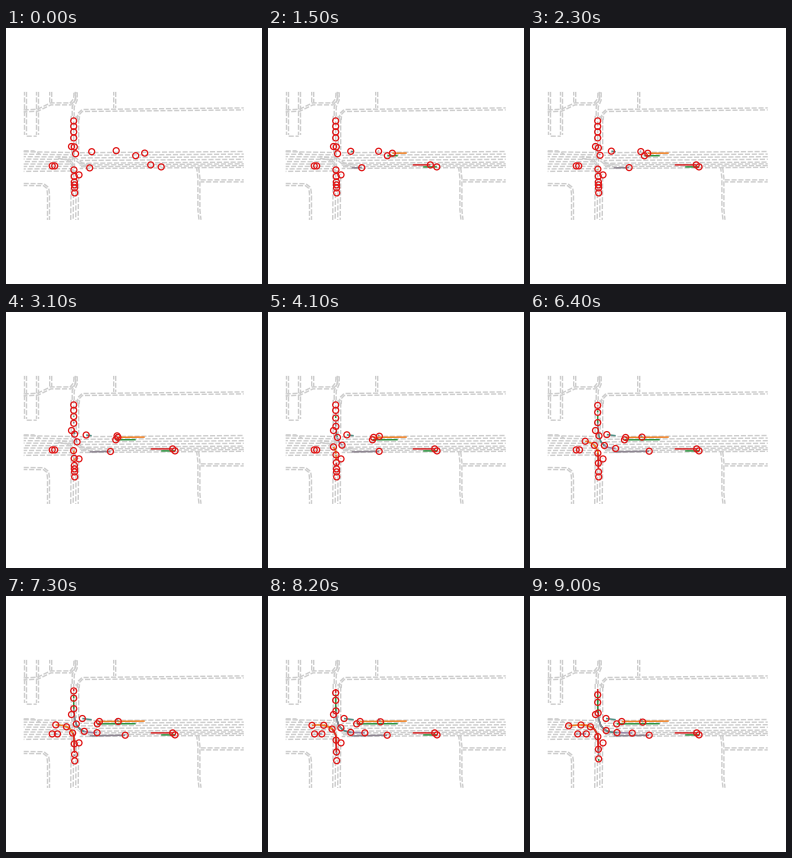
These frames come from a looping animation (256x256 px, 9100 ms). A matplotlib script:

```python
import numpy as np
import matplotlib.pyplot as plt
from matplotlib.animation import FuncAnimation
from matplotlib.patches import Circle

SIZE, DPI = 256, 64
PX = 72 / DPI
FRAMES, STEP = 91, 100
TIMES = np.arange(FRAMES) * STEP / 1000

fig = plt.figure(figsize=(SIZE / DPI, SIZE / DPI), dpi=DPI, facecolor="white")
ax = fig.add_axes([0, 0, 1, 1])
ax.set_xlim(0.3, SIZE + 0.3)
ax.set_ylim(SIZE + 0.1, 0.1)
ax.axis("off")


# --- Street map ---------------------------------------------------------

def lane(pts, shift=0):
    x, y = np.transpose(pts)
    ax.plot(x, y, color="#cdcdcd", lw=1.4 * PX, zorder=1, snap=False,
            linestyle=(shift, (3.6, 1.3)), dash_capstyle="butt")


def street(*pts, gap=2):
    """Two dashed lines on either side of a centre line."""
    p = np.array(pts, float)
    d = np.gradient(p, axis=0)
    normal = np.column_stack([-d[:, 1], d[:, 0]]) / np.hypot(*d.T)[:, None]
    for k, side in enumerate((-0.5, 0.5)):
        lane(p + side * gap * normal, shift=k)


for i, y in enumerate(np.linspace(123.8, 143.5, 9)):
    lane([(18, y), (66, y + 0.8 - 0.15 * i)], shift=i)
for top, bottom in ((124.2, 132), (134.8, 140)):
    for i, y in enumerate(np.linspace(top, bottom, 4)):
        lane([(74, y + 0.6), (238, y - 0.6)], shift=2 * i)
for i, x in enumerate(np.linspace(65.5, 73, 4)):
    lane([(x, 88), (x, 122)], shift=i)
    lane([(x, 146), (x - 0.5, 192)], shift=i)

# Turning lanes inside the junction
street((67, 122), (68.5, 130), (76, 136), (86, 138))
street((69, 146), (67.5, 137), (62, 131), (52, 129.5))
street((67, 122), (68, 134), (67, 146))

# Upper streets
street((72.5, 92), (73, 86), (76.5, 82.6), (238, 81))
street((18, 83), (32, 82.3), (45, 76), (66, 76))
street((67.5, 88), (67.5, 79), (70.5, 72), (70.5, 64))
street((65, 76), (69, 71), (69.3, 64))
street((45, 64), (45, 75))
street((109, 64), (109, 80))
for x in (19.8, 31.8):
    street((x, 64), (x, 107))
lane([(21, 108.3), (31, 108.3)])
lane([(18, 123), (28, 123), (34, 126)])

# Lower streets
street((18, 156.6), (38, 156.8), (42, 160), (42.8, 166), (42.8, 192))
street((192, 140), (193.2, 150), (193.2, 182), (194.3, 192))
street((195, 153), (238, 153))


# --- Vehicle motion -----------------------------------------------------

def launch(start, rate):
    """Distance covered after pulling away at the given time."""
    return rate * np.maximum(TIMES - start, 0) ** 1.337


def brake(stop, power=2):
    """Progress 0..1, slowing down until the given time."""
    return 1 - np.maximum(1 - TIMES / stop, 0) ** power


def along(route, s):
    p = np.array(route, float)
    length = np.r_[0, np.cumsum(np.hypot(*np.diff(p, axis=0).T))]
    return np.interp(s, length, p[:, 0]), np.interp(s, length, p[:, 1])


def slide(x0, y0, x1, y1, u):
    return x0 + (x1 - x0) * u, y0 + (y1 - y0) * u


ORANGE, GREEN, RED, GRAY = "#f08022", "#2c9440", "#d62728", "#8c8490"
TEAL, PURPLE = "#4f8f85", "#9a86a8"

SOUTH = [(68, 93), (68, 112), (69, 123), (71, 129.5), (74.5, 133.5),
         (77.5, 135.2), (83, 136.5), (104, 137.2)]
NORTH = [(69, 165), (68.5, 146), (68, 139), (65, 133.7), (62.5, 131.5),
         (56.5, 129.4), (50, 129), (36, 130.2)]

# Queued cars: place in line, departure time, pull-away rate, colour
SOUTH_QUEUE = [(33, 1.6, 2.6, PURPLE), (26, 1.7, 2.07, TEAL), (17, 2.4, 2.2, GRAY),
               (11, 2.4, 1.05, GREEN), (5.5, 5, 1.25, GREEN), (0, 5.9, 1.3, RED)]
NORTH_QUEUE = [(23, 1.9, 2.65, ORANGE), (16.5, 2.2, 2.35, ORANGE), (11, 2.8, 2.3, RED),
               (8, 4.2, 2, RED), (5, 6.5, 1.95, GRAY), (0, 8, 2, GREEN)]

cars = [
    (slide(139, 125.2, 92, 125.6, brake(9)), ORANGE),
    (slide(130, 127.8, 82.5, 128, brake(13)), GREEN),
    (slide(110.5, 122.8, 113, 126.2, brake(9, 1)), GRAY),
    (slide(86, 123.8, 76.3, 122.6, brake(9)), TEAL),
    (slide(145, 137, 167, 137, brake(2.7)), RED),
    (slide(155.5, 139, 169.3, 139, brake(1.7)), GREEN),
    (slide(84, 140, 119.5, 139.3, brake(5.3, 1)), GRAY),
    (along([(46.5, 138), (60, 138)], launch(7.8, 1.2)), GRAY),
    (along([(49, 138), (60, 138)], launch(5.8, 1.6)), PURPLE),
    (slide(65.8, 118.6, 65.8, 118.6, 0 * TIMES), GRAY),
    (slide(73.3, 147, 73.3, 147, 0 * TIMES), GRAY),
]
for route, queue in ((SOUTH, SOUTH_QUEUE), (NORTH, NORTH_QUEUE)):
    cars += [(along(route, s + launch(t, rate)), c) for s, t, rate, c in queue]

paths = [path for path, _ in cars]
trails = [ax.plot([], [], color=c, lw=1.5 * PX, zorder=2, snap=False,
                  solid_capstyle="butt")[0] for _, c in cars]
rings = [ax.add_patch(Circle((0, 0), 3, fill=False, ec="#e01515", lw=1.25 * PX, zorder=3))
         for _ in cars]


def draw(n):
    for (x, y), trail, ring in zip(paths, trails, rings):
        trail.set_data(x[:n + 1], y[:n + 1])
        ring.center = x[n], y[n]
    return trails + rings


anim = FuncAnimation(fig, draw, frames=FRAMES, interval=STEP, repeat=True,
                     repeat_delay=0, blit=False)
plt.show()
```
